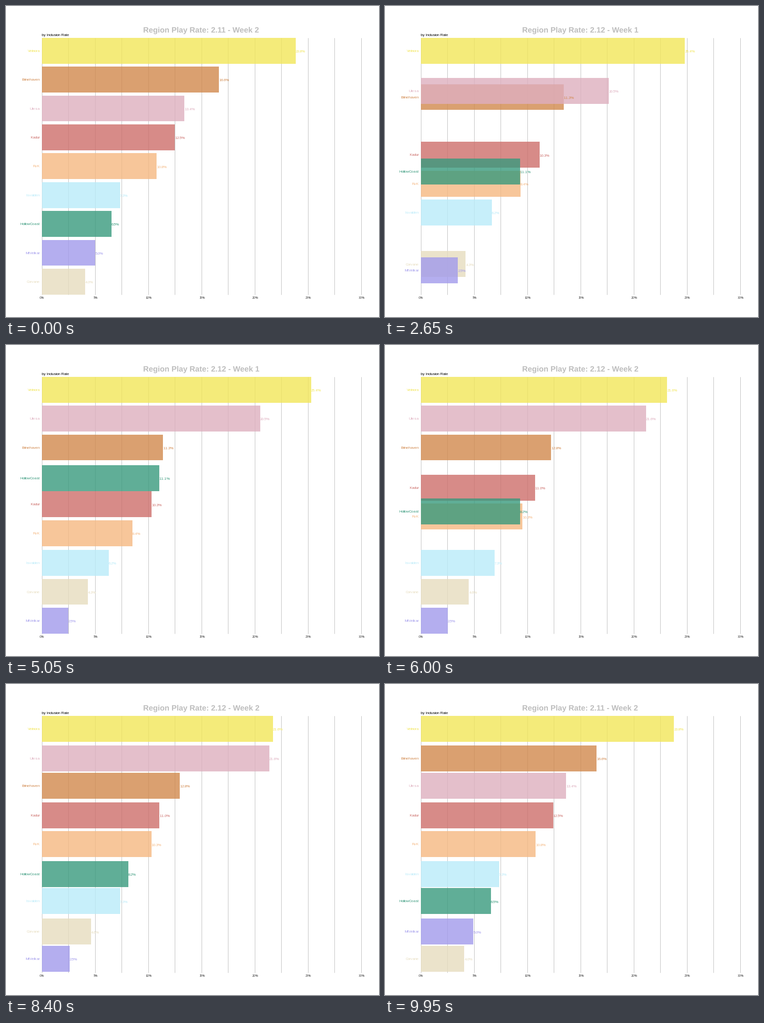
A matplotlib script for the animation above (10 s loop, 820x683 px).

```python
import matplotlib.pyplot as plt
from matplotlib.animation import FuncAnimation
from matplotlib.patches import PathPatch, Rectangle
from matplotlib.textpath import TextPath
from matplotlib.transforms import Affine2D

W, H, DPI = 820, 683, 64
FRAMES, STEP = 200, 50
MOVE = 33                      # frames per transition
STARTS = (33, 100, 167)        # first frame of each transition
X0, UNIT = 79.0, 23.4          # zero line, pixels per percent
TOP, PITCH, BAR = 69.7, 63.4, 56.95
GREY = "#BEBEBE"

TITLES = ["2.11 - Week 2", "2.12 - Week 1", "2.12 - Week 2"]

# name, colour, share per week, rank per week (in drawing order)
REGIONS = [
    ("Brinehaven", "#D1884C", (16.62, 11.32, 12.84), (2, 3, 3)),
    ("Corvane", "#E7DDBF", (4.04, 4.29, 4.62), (9, 8, 8)),
    ("Isvalden", "#B9EBF9", (7.33, 6.23, 7.34), (6, 7, 7)),
    ("Ulesa", "#DEAFBF", (13.38, 20.46, 21.61), (3, 2, 2)),
    ("MtVelkar", "#A19AEC", (5.01, 2.47, 2.53), (8, 9, 9)),
    ("Kadur", "#CD6E6A", (12.47, 10.27, 11.00), (4, 5, 4)),
    ("RvK", "#F5B881", (10.78, 8.43, 10.27), (5, 6, 5)),
    ("HollowCoast", "#389A7D", (6.53, 11.10, 8.16), (7, 4, 6)),
    ("Velmora", "#F2E659", (23.84, 25.42, 21.64), (1, 1, 1)),
]

# whole-pixel hinting keeps the small labels crisp
plt.rcParams.update({"font.family": "Liberation Sans",
                     "text.hinting": "force_autohint",
                     "text.hinting_factor": 1})
fig = plt.figure(figsize=(W / DPI, H / DPI), dpi=DPI, facecolor="white")
ax = fig.add_axes([0, 0, 1, 1])
ax.set_xlim(0, W)
ax.set_ylim(H, 0)
ax.axis("off")


def label(x, y, text, px, color, ha="left"):
    return ax.text(x, y, text, fontsize=px * 72 / DPI, color=color,
                   ha=ha, va="baseline", zorder=3)


def heading(text):
    path = TextPath((0, 0), text, size=17,
                    prop={"family": "Liberation Sans", "weight": "bold"})
    flip = Affine2D().scale(1, -1).translate(301.5, 58.3)
    return ax.add_patch(PathPatch(flip.transform_path(path), fc=GREY, lw=0))


for k in range(13):
    x = int(X0 + 2.5 * UNIT * k + 0.01) + 0.2   # snaps to one pixel column
    ax.plot([x, x], [70, 634], color=GREY, lw=72 / DPI,
            solid_capstyle="butt", zorder=1)
    if k % 2 == 0:
        label(x, 643, f"{k * 5 // 2}%", 7, "#4D4D4D", "center")

titles = [heading("Region Play Rate: " + week) for week in TITLES]
label(79, 66, "by Inclusion Rate", 8, "black")

bars, names, shares = [], [], []
for name, color, _, _ in REGIONS:
    bar = Rectangle((X0, TOP), 1, BAR, fc=color, alpha=0.8, lw=0, zorder=2)
    bars.append(ax.add_patch(bar))
    names.append(label(75.3, 0, name, 8, color, "right"))
    shares.append(label(0, 0, "", 8, color))


def phase(frame):
    """Return previous week, next week and progress between them."""
    week = 0
    for i, start in enumerate(STARTS):
        if frame >= start + MOVE:
            week = (i + 1) % 3
        elif frame > start:
            return i, (i + 1) % 3, (frame - start) / MOVE
    return week, week, 0.0


def update(frame):
    a, b, t = phase(frame)
    near = b if t >= 0.5 else a
    for i, title in enumerate(titles):
        title.set_visible(i == near)
    for (_, _, vals, ranks), bar, name, share in zip(REGIONS, bars, names, shares):
        value = vals[a] + (vals[b] - vals[a]) * t
        rank = ranks[a] + (ranks[b] - ranks[a]) * t
        y = TOP + PITCH * (rank - 1)
        mid = y + BAR / 2
        bar.set_y(y)
        bar.set_width(value * UNIT)
        name.set_y(mid + 2.6)
        share.set_position((X0 + value * UNIT, mid + 3.9))
        share.set_text(f"{vals[near]:.1f}%")
    return [*titles, *bars, *names, *shares]


anim = FuncAnimation(fig, update, frames=FRAMES, interval=STEP,
                     repeat=True, repeat_delay=0, blit=False)
plt.show()
```
